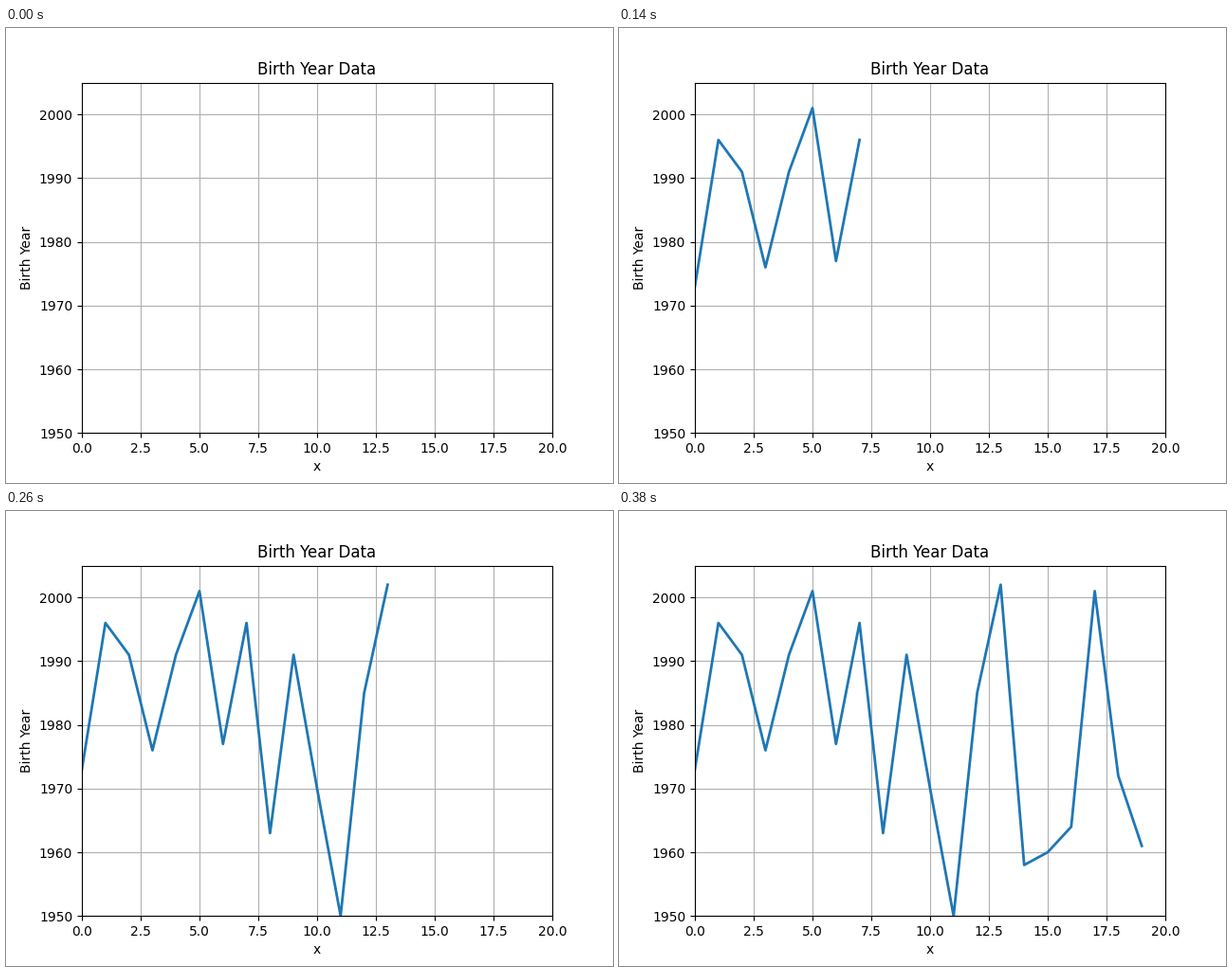
Write a matplotlib script that moves like this. It is 640 px wide and 480 px high and loops after 400 ms.

```python
import numpy as np
import matplotlib.pyplot as plt
from matplotlib.animation import FuncAnimation

# The plotted data: one birth year per unit step in x.
years = np.array([1973, 1996, 1991, 1976, 1991, 2001, 1977, 1996, 1963, 1991,
                  1970, 1950, 1985, 2002, 1958, 1960, 1964, 2001, 1972, 1961])
x = np.arange(len(years))

plt.rcParams["font.family"] = "DejaVu Sans"

fig, ax = plt.subplots(figsize=(6.4, 4.8), dpi=100)
ax.set(xlim=(0, len(years)), ylim=(1950, 2005), title="Birth Year Data",
       xlabel="x", ylabel="Birth Year")
ax.grid()
line, = ax.plot([], [], color="tab:blue", lw=2)


def update(i):
    """Show the series up to and including point i."""
    line.set_data(x[:i + 1], years[:i + 1])
    return line,


anim = FuncAnimation(fig, update, frames=len(years), interval=20,
                     repeat=True, repeat_delay=0)
plt.show()
```
